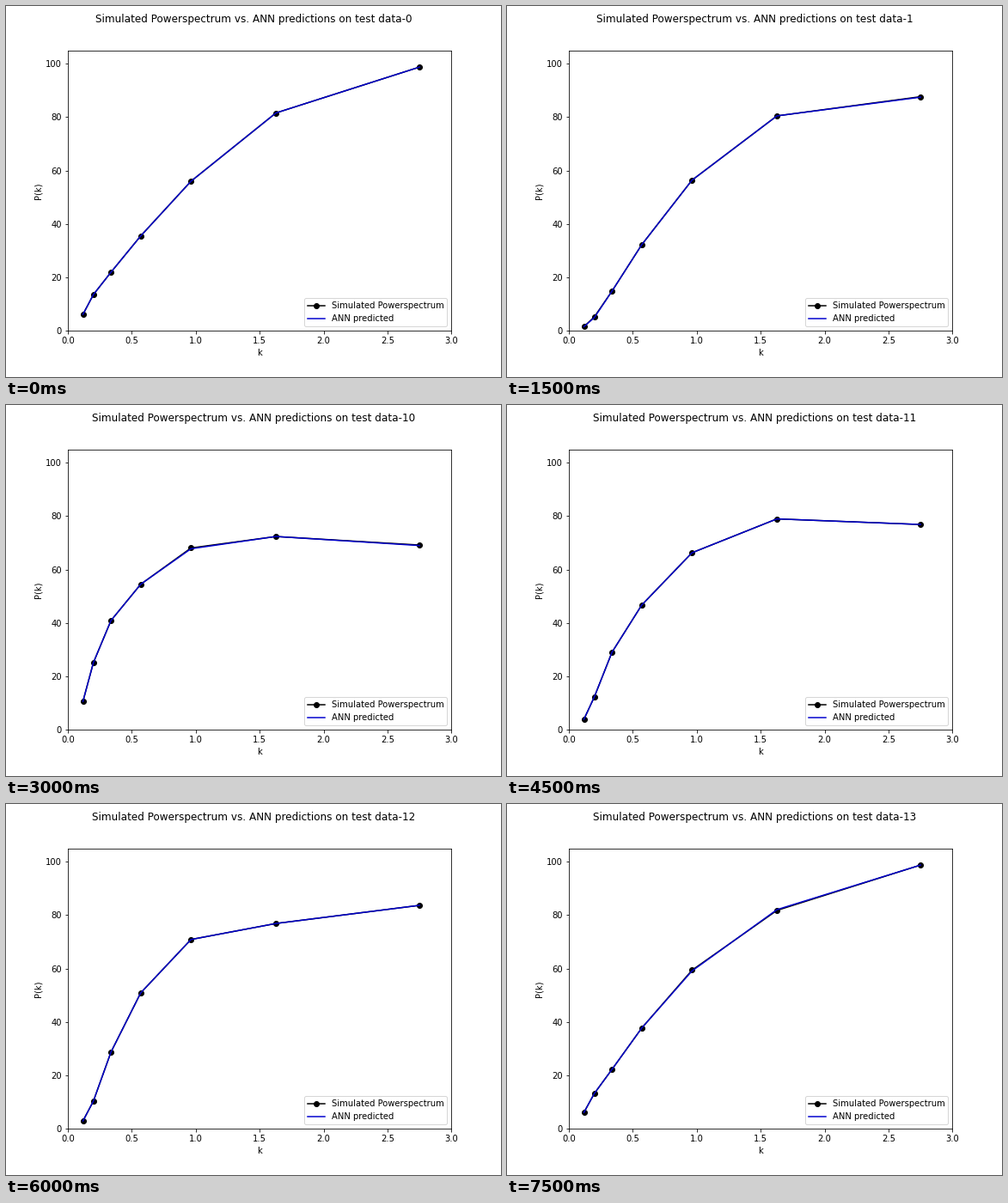
These frames come from a looping animation (576x432 px, 8 s). A matplotlib script:

```python
import matplotlib.pyplot as plt
import numpy as np
from matplotlib.animation import FuncAnimation

STEP = 500           # ms per drawn frame
HOLD = 3             # drawn frames per test case
TITLE = "Simulated Powerspectrum vs. ANN predictions on test data-{}"

# Wavenumber bins, evenly spaced in log k
k = 2.75 / 1.69 ** np.arange(6, -1, -1)

cases = [0, 1, 10, 11, 12, 13]
simulated = np.array([
    [6.1, 13.5, 21.9, 35.5, 56.0, 81.6, 98.8],
    [1.5, 5.2, 14.8, 32.2, 56.4, 80.5, 87.7],
    [10.6, 25.1, 40.9, 54.5, 68.1, 72.4, 69.2],
    [3.9, 12.3, 29.0, 46.7, 66.3, 79.0, 76.9],
    [2.9, 10.3, 28.7, 50.9, 70.9, 76.9, 83.7],
    [6.1, 13.2, 22.2, 37.7, 59.4, 81.8, 98.8],
])
# Small errors of the network: (case row, bin) -> offset
errors = {(1, 1): -0.3, (1, 6): -0.2, (2, 4): -0.3, (2, 6): -0.2,
          (5, 4): -0.3, (5, 5): 0.3}
predicted = simulated.copy()
for cell, offset in errors.items():
    predicted[cell] += offset

fig, ax = plt.subplots(figsize=(8, 6), dpi=72)
fig.subplots_adjust(left=0.125, right=0.9, bottom=0.125, top=0.88)
title = fig.suptitle("", fontsize=12)

sim_line, = ax.plot([], [], "k-o", label="Simulated Powerspectrum")
ann_line, = ax.plot([], [], color="mediumblue", label="ANN predicted")
ax.set(xlim=(0, 3), ylim=(0, 105), xlabel="k", ylabel="P(k)")
ax.legend(loc="lower right")


def draw(frame):
    row = frame // HOLD
    title.set_text(TITLE.format(cases[row]))
    sim_line.set_data(k, simulated[row])
    ann_line.set_data(k, predicted[row])
    return title, sim_line, ann_line


anim = FuncAnimation(fig, draw, frames=8000 // STEP, interval=STEP,
                     init_func=lambda: draw(0), repeat=True, repeat_delay=0)
plt.show()
```
